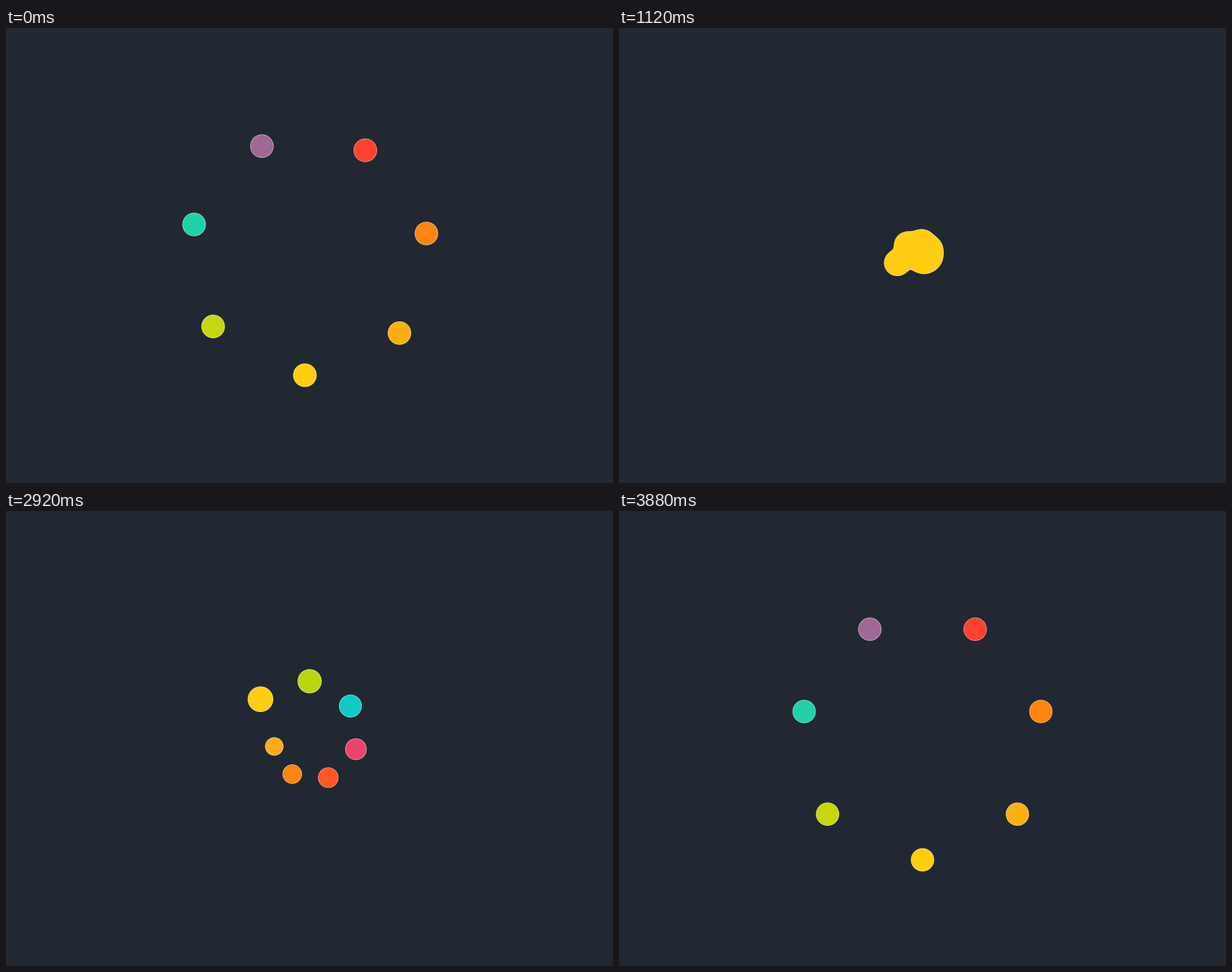
An HTML page with a canvas for the animation above (4.12 s loop, 800 by 600 pixels).

```html
<!DOCTYPE html>
<html lang="en">
<head>
<meta charset="utf-8">
<title>Swirling blobs</title>
<style>
  html, body { margin: 0; width: 100%; height: 100%; overflow: hidden; background: #222831; }
  canvas { display: block; }
</style>
</head>
<body>
<canvas width="800" height="600"></canvas>
<script>
const LOOP = 4120, STEP = 40, CX = 400, CY = 300, COUNT = 7;
const BG = [34, 40, 49], YELLOW = [255, 205, 17];

// resting colour and swirled colour of each ball, clockwise from the bottom
const COLORS = [
  [YELLOW, YELLOW],
  [[198, 214, 15], [186, 214, 18]],
  [[34, 208, 169], [17, 202, 200]],
  [[158, 106, 149], [234, 68, 110]],
  [[255, 64, 50], [255, 86, 38]],
  [[255, 132, 18], [255, 132, 18]],
  [[255, 174, 18], [255, 172, 24]]
];

const ctx = document.querySelector('canvas').getContext('2d');
const clamp = v => Math.max(0, Math.min(1, v));
const ramp = (v, a, b) => clamp((v - a) / (b - a));
const mix = (a, b, k) => a + (b - a) * k;
const mixColor = (a, b, k) => a.map((v, i) => mix(v, b[i], k));

// monotone cubic curve through a few points
function curve(xs, ys) {
  const slope = xs.slice(1).map((x, i) => (ys[i + 1] - ys[i]) / (x - xs[i]));
  const tan = xs.map((_, i) => {
    const a = slope[i - 1], b = slope[i];
    return a * b > 0 ? 2 * a * b / (a + b) : 0;
  });
  return x => {
    let i = 0;
    while (i < xs.length - 2 && x > xs[i + 1]) i++;
    const w = xs[i + 1] - xs[i], u = clamp((x - xs[i]) / w), v = 1 - u;
    return v * v * ((1 + 2 * u) * ys[i] + u * w * tan[i]) +
           u * u * ((1 + 2 * v) * ys[i + 1] - v * w * tan[i + 1]);
  };
}

const KEYS = [-200, 0, 440, 640, 880, 1100, 1680];
const orbit = curve(KEYS, [160, 158, 128, 101.8, 64, 36.5, 0]);
const turn = curve(KEYS, [0, 2.2, 38.7, 82.7, 195, 415, 900]);
const size = curve(KEYS, [15.3, 15.5, 16, 16.6, 17, 17.2, 23]);

// swirl in, rest, then play the swirl backwards
function phase(t) {
  if (t < 2260) return Math.min(t, 1680);
  if (t < 2600) {
    const k = (2600 - t) / 340;
    return 1080 + 340 * k + 260 * k * k;
  }
  return Math.max(3680 - t, -200);
}

function ballsAt(p) {
  const rot = turn(p), shrink = 1 - rot / 1460;
  const even = ramp(p, 700, 1050), gold = ramp(p, 820, 1040);
  return COLORS.map(([rest, swirled], i) => {
    const angle = (90 + rot + i * 360 / COUNT) * Math.PI / 180;
    const r = orbit(p) * shrink ** i;
    const s = size(p) * mix(shrink ** (0.75 * i), 1, even);
    const color = mixColor(mixColor(rest, swirled, clamp(rot / 82.7)), YELLOW, gold);
    return { x: CX + r * Math.cos(angle), y: CY + r * Math.sin(angle), s2: s * s, color };
  });
}

function draw(p) {
  const balls = ballsAt(p), pad = 36;
  const xs = balls.map(b => b.x), ys = balls.map(b => b.y);
  const x0 = Math.floor(Math.min(...xs) - pad), y0 = Math.floor(Math.min(...ys) - pad);
  const w = Math.ceil(Math.max(...xs) + pad) - x0, h = Math.ceil(Math.max(...ys) + pad) - y0;
  const img = ctx.createImageData(w, h), px = img.data;

  for (let j = 0, o = 0; j < h; j++) {
    for (let i = 0; i < w; i++, o += 4) {
      let field = 0, gx = 0, gy = 0, best = 0, top = balls[0];
      for (const b of balls) {
        const dx = x0 + i + 0.5 - b.x, dy = y0 + j + 0.5 - b.y;
        const d2 = dx * dx + dy * dy + 0.01, q = b.s2 / d2, f = q * q * q;
        field += f;
        gx += f * dx / d2;
        gy += f * dy / d2;
        if (f > best) { best = f; top = b; }
      }
      let cover = 0, rim = 0;
      if (field > 2) cover = 1;
      else if (field > 0.4) {
        const dist = Math.log(field) * field / (6 * Math.hypot(gx, gy));
        cover = clamp(dist + 0.5);
        rim = 0.5 * clamp(1.2 - dist);
      }
      for (let c = 0; c < 3; c++) {
        px[o + c] = mix(BG[c], mix(top.color[c], 255, rim), cover);
      }
      px[o + 3] = 255;
    }
  }
  ctx.fillStyle = `rgb(${BG})`;
  ctx.fillRect(0, 0, 800, 600);
  ctx.putImageData(img, x0, y0);
}

const start = performance.now();
let shown = null;

function tick() {
  const t = Math.max(0, performance.now() - start) % LOOP;
  const p = phase(Math.floor(t / STEP) * STEP);
  if (p !== shown) draw(shown = p);
  requestAnimationFrame(tick);
}
tick();
</script>
</body>
</html>
```
